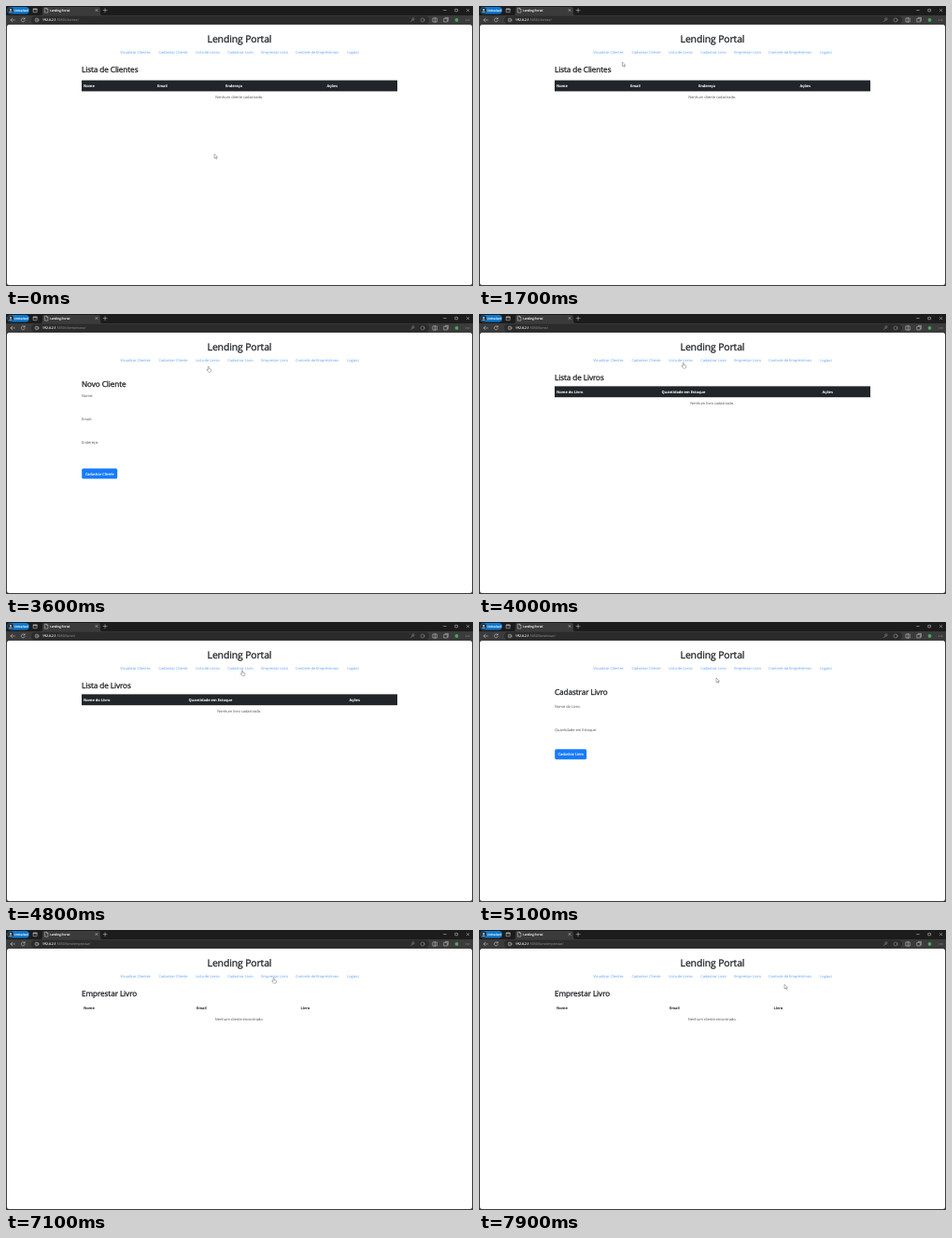
An HTML page for the animation above (8000 ms loop, 500 px wide and 300 px high).

```html
<!DOCTYPE html>
<html lang="pt-BR">
<head>
<meta charset="utf-8">
<title>Lending Portal</title>
<style>
  html, body { margin: 0; width: 100%; height: 100%; overflow: hidden; background: #3b3b3b; }
  svg { display: block; width: 100%; height: 100%; }
  text {
    font: 4px "Open Sans", "Noto Sans", sans-serif;
    letter-spacing: -.015em;
    fill: #212529;
    text-rendering: geometricPrecision;
    white-space: pre;
  }
  .title, .heading { fill: #1b1f23; stroke: #1b1f23; stroke-width: .28; letter-spacing: -.01em; }
  .title { font-size: 10.4px; }
  .heading { font-size: 8.2px; }
  .link { fill: #5c9ffb; }
  .label { fill: #4c4f52; }
  .bold { font-weight: 700; }
  .light { fill: #fff; }
  .strong { stroke: #fff; stroke-width: .12; }
  .mid { text-anchor: middle; }
  .small { font-size: 3.25px; }
  .address { font-size: 3.5px; fill: #a0a0a0; letter-spacing: 0; }
  .icon { fill: none; stroke: #c8c8c8; stroke-width: .55; stroke-linecap: round; stroke-linejoin: round; }
  .pointer { fill: #fff; stroke: #5a5a5a; stroke-width: .45; stroke-linejoin: round; }
</style>
</head>
<body>
<svg viewBox="0 0 500 300">
  <!-- browser window -->
  <rect width="500" height="300" fill="#3b3b3b"/>
  <rect width="500" height="10" fill="#1c1c1c"/>
  <path d="M37 10q2 0 2-2V3q0-2 2-2h58q2 0 2 2v5q0 2 2 2z" fill="#3b3b3b"/>
  <rect x="1.4" y="1" width="23.4" height="7.4" rx="3.7" fill="#0f79cf"/>
  <circle cx="5" cy="4.7" r="3.1" fill="#22303c"/>
  <circle cx="5" cy="4" r="1.1" fill="#b9c4cc"/>
  <path d="M3 6.8q2-2.6 4 0z" fill="#b9c4cc"/>
  <text class="light strong small" x="8.6" y="5.9">Untracked</text>
  <path class="icon" d="M29.5 2.9h3.6v3.8h-3.6zM29.5 3.4h3.6M29.5 3.9h3.6"/>
  <path class="icon" d="M41.8 2.3h1.9l1.2 1.2v3.6h-3.1zM43.6 2.4v1.2h1.2"/>
  <text class="light strong small" x="47" y="5.9">Lending Portal</text>
  <path class="icon" d="M95.9 3.4l2.2 2.2m0-2.2l-2.2 2.2M104.2 4.6h3.8m-1.9-1.9v3.8"/>
  <path class="icon" d="M468.6 4.6h2.6M481.2 3.4h2.4v2.4h-2.4zM493.4 3.4l2.4 2.4m0-2.4l-2.4 2.4"/>

  <rect x="27" y="10.8" width="426" height="8.4" rx="4.2" fill="#2b2b2b"/>
  <path class="icon" d="M9.4 15H5m1.9-1.9L5 15l1.9 1.9M20 13.8a2 2 0 1 0 .2 1.8M20.2 12.6v1.4h-1.4"/>
  <circle class="icon" cx="33" cy="15" r="1.9"/>
  <path class="icon" d="M33 14.9v1M33 14v0"/>
  <path class="icon" d="M433.5 16.6l1.6-1.6m.1 0a1.2 1.2 0 1 1 1 .2z" opacity=".7"/>
  <circle class="icon" cx="446" cy="15" r="2" opacity=".7"/>
  <path class="icon" d="M457.3 13h4v4h-4zM459.3 12.6v4.8M469.2 13.4h3.2v3.6h-3.2zM470.4 12.4h3v3.6"/>
  <circle cx="482.5" cy="15" r="1.9" fill="#4aa564"/>
  <g fill="#d6d6d6"><circle cx="492.6" cy="15" r=".45"/><circle cx="494.3" cy="15" r=".45"/><circle cx="496" cy="15" r=".45"/></g>
  <text class="address" x="39" y="16.4"><tspan class="light strong">192.0.2.1</tspan><tspan>:5050</tspan><tspan id="path"></tspan></text>

  <!-- site -->
  <rect x="1" y="20" width="498" height="279" rx="2.5" fill="#fff"/>
  <text class="title mid" x="250" y="38.5">Lending Portal</text>
  <g id="nav"></g>
  <g id="content"></g>

  <path id="arrow" class="pointer" d="M0 0v4.8l1.2-1.1.8 1.8.8-.4-.8-1.7h1.5z"/>
  <path id="hand" class="pointer" d="M-.6.5Q0-.5.6.5V2.7l1.8.4q.8.2.7 1l-.4 1.3q-.2.8-1 .8H.3q-.6 0-.9-.6L-2 3.8q.2-.8.9-.3l.5.4z"/>
</svg>
<script>
const $ = id => document.getElementById(id);
const label = (x, y, str, cls = "label") => `<text x="${x}" y="${y}" class="${cls}">${str}</text>`;
const heading = (y, str) => label(81, y, str, "heading");

const table = (y, columns, message, dark = true) =>
  (dark ? `<rect x="81" y="${y}" width="338" height="11.8" fill="#212529"/>` : "") +
  columns.map(([x, str]) => label(x, y + 7.5, str, dark ? "bold light" : "bold")).join("") +
  label(249.7, y + 19.3, message, "label mid");

const button = (y, width, str) =>
  `<rect x="81.2" y="${y}" width="${width}" height="11" rx="1.6" fill="#167bfb"/>` +
  label(81.2 + width / 2, y + 7, str, "mid light strong");

const pages = [
  { start: 0, path: "/clientes/", html: heading(70.8, "Lista de Clientes") +
      table(79.6, [[83, "Nome"], [162, "Email"], [235, "Endereço"], [343.5, "Ações"]], "Nenhum cliente cadastrado.") },
  { start: 2500, path: "/cliente/novo/", html: heading(77.6, "Novo Cliente") +
      label(81, 89.2, "Nome:") + label(81, 114.1, "Email:") + label(81, 139, "Endereço:") +
      button(165.6, 38, "Cadastrar Cliente") },
  { start: 4000, path: "/livros/", html: heading(70.8, "Lista de Livros") +
      table(77.4, [[83, "Nome do Livro"], [195.5, "Quantidade em Estoque"], [367.5, "Ações"]], "Nenhum livro cadastrado.") },
  { start: 5000, path: "/livro/novo/", html: heading(77.6, "Cadastrar Livro") +
      label(81, 91.6, "Nome do Livro:") + label(81, 116.5, "Quantidade em Estoque:") +
      button(136.2, 34, "Cadastrar Livro") },
  { start: 7100, path: "/livro/emprestar/", html: heading(70.8, "Emprestar Livro") +
      table(77.4, [[83, "Nome"], [204, "Email"], [315.5, "Livro"]], "Nenhum cliente encontrado.", false) },
];

$("nav").innerHTML = [
  [138.5, "Visualizar Clientes"], [179, "Cadastrar Cliente"], [216, "Lista de Livros"],
  [251, "Cadastrar Livro"], [287.5, "Emprestar Livro"], [333, "Controle de Empréstimos"], [371.5, "Logout"],
].map(([x, str]) => label(x, 50.5, str, "link mid")).join("");

// time, x, y of the pointer tip
const moves = [
  [900, 223, 158.5], [1700, 153.4, 60], [1800, 163.5, 57.5], [2100, 187, 51.6],
  [2600, 187, 51.6], [3300, 206, 78], [3700, 218.8, 52],
  [4000, 218.8, 52], [4800, 253, 51.6], [5000, 253, 51.6], [5100, 254, 60], [5300, 264, 84],
  [5400, 264, 84], [5700, 268, 87], [6300, 286.6, 51],
  [7100, 286.6, 51], [7900, 327, 58.3],
];
// spans in which the pointer rests on a link
const hovers = [[2100, 2700], [3600, 4200], [4600, 5000], [6200, 7200]];

function pointerAt(t) {
  const next = moves.findIndex(m => m[0] > t);
  if (next === 0) return moves[0].slice(1);
  if (next < 0) return moves[moves.length - 1].slice(1);
  const [t0, x0, y0] = moves[next - 1], [t1, x1, y1] = moves[next];
  const p = (t - t0) / (t1 - t0), e = p * p * (3 - 2 * p);
  return [x0 + (x1 - x0) * e, y0 + (y1 - y0) * e];
}

const LOOP = 8000, STEP = 100;
let shown;

function draw() {
  const t = Math.floor(performance.now() % LOOP / STEP) * STEP;
  const page = pages.filter(p => p.start <= t).pop();
  if (page !== shown) {
    shown = page;
    $("content").innerHTML = page.html;
    $("path").textContent = page.path;
  }
  const onLink = hovers.some(([from, to]) => t >= from && t <= to);
  const place = `translate(${pointerAt(t)})`;
  for (const [id, visible] of [["arrow", !onLink], ["hand", onLink]]) {
    $(id).setAttribute("transform", place);
    $(id).style.display = visible ? "" : "none";
  }
  requestAnimationFrame(draw);
}
draw();
</script>
</body>
</html>
```
